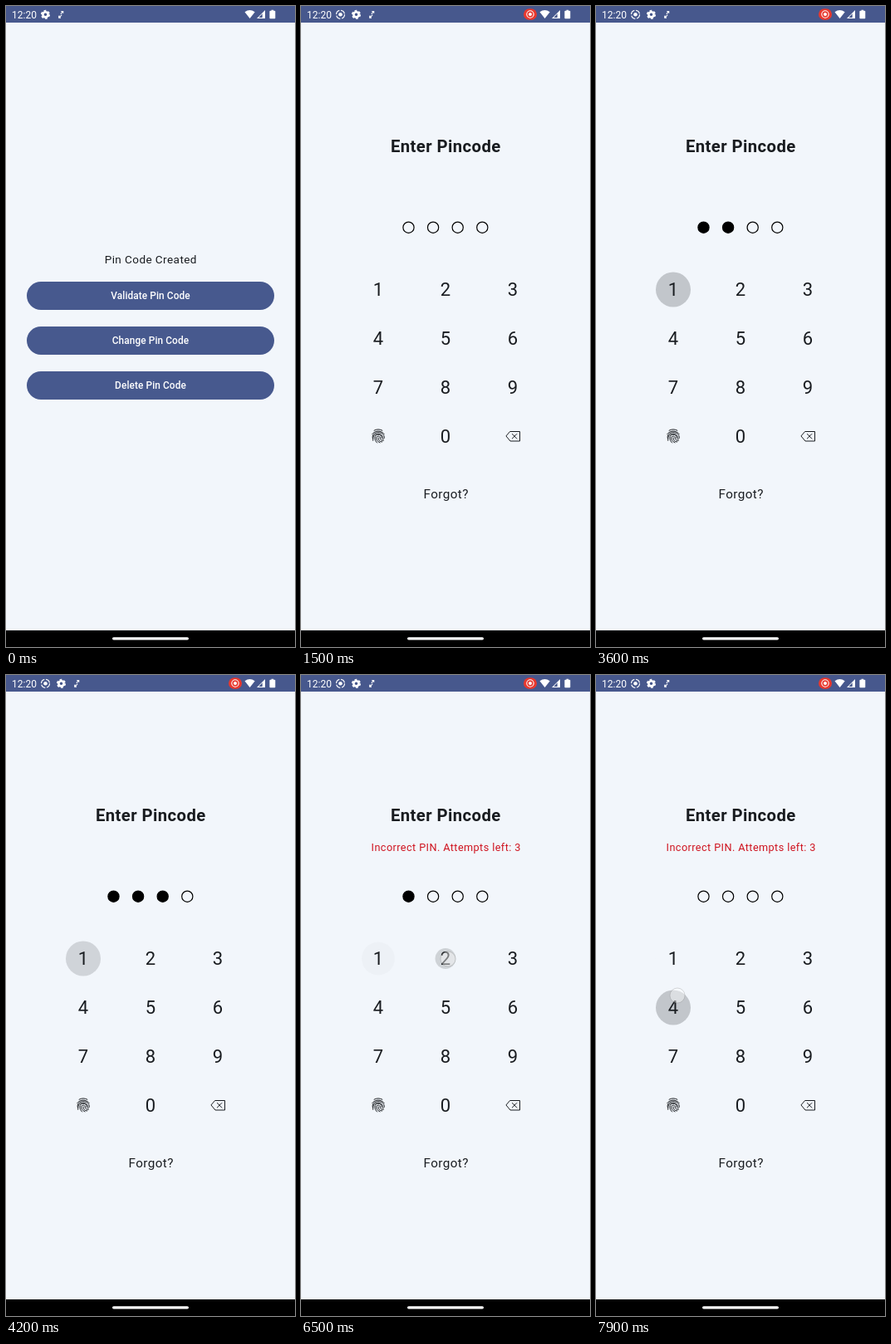
An HTML page for the animation above (8 s loop, 348 by 772 pixels).

```html
<!DOCTYPE html>
<html lang="en">
<head>
<meta charset="utf-8">
<title>Pin code</title>
<style>
  html, body { margin: 0; width: 100%; height: 100%; overflow: hidden; background: #f2f6fb; }
  svg { display: block; width: 100vw; height: 100vh; }
  text { font-family: Roboto, "Noto Sans", sans-serif; fill: #191c20; text-anchor: middle; }
  .body { font-size: 13.55px; letter-spacing: .423px; }
  .label { font-size: 11.86px; font-weight: 500; letter-spacing: .085px; fill: #fff; }
  .title { font-size: 20.3px; font-weight: 700; letter-spacing: .423px; }
  .error { font-size: 12.7px; letter-spacing: .41px; fill: #cf1420; }
  .forgot { font-size: 15.25px; letter-spacing: .423px; }
  .key { font-size: 22px; }
  .line { fill: none; stroke: #191c20; stroke-linecap: round; stroke-linejoin: round; }
</style>
</head>
<body>
<svg viewBox="0 0 348 772">
  <defs>
    <clipPath id="pill"><rect x="25" y="332" width="298" height="34" rx="17"/></clipPath>
    <radialGradient id="glow">
      <stop offset="0" stop-color="#fff" stop-opacity=".24"/>
      <stop offset=".5" stop-color="#fff" stop-opacity=".21"/>
      <stop offset="1" stop-color="#fff" stop-opacity="0"/>
    </radialGradient>
  </defs>
  <rect width="348" height="772" fill="#f2f6fb"/>

  <g id="menu">
    <text class="body" x="174.3" y="310">Pin Code Created</text>
    <g id="buttons"></g>
  </g>

  <g id="pin">
    <text class="title" x="174.3" y="176">Enter Pincode</text>
    <text class="error" id="error" x="174.7" y="212.3">Incorrect PIN. Attempts left: 3</text>
    <g id="dots" stroke="#000" stroke-width="1.2"></g>
    <g id="ripples" fill="#191c20"></g>
    <g id="keys"></g>
    <g class="line" transform="translate(82.8 507.8) scale(.847)" stroke-width="1.15">
      <path d="M6.2 4c3.6-2 8-2 11.6 0M3.5 9.2c4-5.6 13-5.6 17 0M4.2 15.5C2.8 10.5 6.5 6.9 12 6.9s9 3.6 8.6 7.6c-.3 2.3-3.6 2.2-3.8-.3-.3-6-9.6-6-9.6.2 0 3 1.2 5.4 3.2 7.2"/>
      <path d="M4.6 18.3c-.3-8 2.4-9.2 7.4-9.2 3.600 0 6.600 2 6.600 5M14.400 21.400c-3.500-1.400-5-4-5-7 0-3 5-3 5.200 0 .2 3 2.200 4.400 5 3.900M12 14.400c.1 3.600 2 6 5.600 5.900"/>
    </g>
    <path class="line" d="M252 512.500h11.500v11.500h-11.500l-4.800-5.750zM254.300 515.500l5.500 5.500m0-5.500l-5.500 5.500"/>
    <text class="forgot" x="174.700" y="593.300">Forgot?</text>
  </g>

  <circle id="touch" r="9" fill="#fff" fill-opacity=".42" stroke="#777" stroke-opacity=".35" stroke-width=".8"/>

  <rect width="348" height="20" fill="#47588d"/>
  <text x="7" y="14.600" style="font-size:12px;fill:#fff;text-anchor:start">12:20</text>
  <g id="record" fill="none" stroke="#fff">
    <circle cx="47.500" cy="10.300" r="5" stroke-dasharray="6 1.850" stroke-width="1.200"/>
    <circle cx="47.500" cy="10.300" r="2.300" fill="#fff" stroke="none"/>
  </g>
  <g id="tray">
    <circle cx="47.500" cy="10.300" r="3.100" fill="none" stroke="#fff" stroke-width="2.600"/>
    <circle cx="47.500" cy="10.300" r="4.700" fill="none" stroke="#fff" stroke-width="1.700" stroke-dasharray="2.700 2.222"/>
    <path d="M64.300 11.500l-.6 2.500M68.600 6.300l-2.800 3.300M67.200 10.500l-3 3.600M66.300 6.500h2.400v2.300M63.700 11.900v2.300h2.300" fill="none" stroke="#fff" stroke-width="1.100"/>
  </g>
  <g id="chip">
    <rect x="-8" y="-6.800" width="16" height="13.600" rx="6.800" fill="#e8382e"/>
    <circle r="4.200" fill="none" stroke="#fff" stroke-width="1.100"/>
    <circle r="2" fill="#fff"/>
  </g>
  <g fill="#fff">
    <path d="M287.500 7.300q6-4.800 12.200 0l-6.100 7.700z"/>
    <path d="M312 5v10h-10z"/>
    <path d="M308.700 9.300v4.700h-4.300z" fill="#47588d"/>
    <path d="M319.500 4.700h2.700v1h1.300q.8 0 .8.800v8q0 .8-.8.800h-5.300q-.8 0-.8-.8v-8q0-.8.800-.8h1.300z"/>
  </g>

  <rect y="752" width="348" height="20"/>
  <rect x="128" y="760.200" width="92" height="3.200" rx="1.600" fill="#fff"/>
</svg>
<script>
const LOOP = 8000, OPEN = 1500, FIRST_TRY = 4660;
const $ = id => document.getElementById(id);
const ramp = (t, a, b) => Math.min(1, Math.max(0, (t - a) / (b - a)));
const show = (el, on) => el.setAttribute("visibility", on ? "visible" : "hidden");

function add(parent, tag, attrs, text = "") {
  const el = document.createElementNS("http://www.w3.org/2000/svg", tag);
  for (const name in attrs) el.setAttribute(name, attrs[name]);
  el.textContent = text;
  return parent.appendChild(el);
}

// Moment of finger down, moment of entry, finger position, key
const taps = [
  [2600, 2800, 91, 339, 1], [3150, 3350, 91, 339, 1],
  [3700, 3900, 91, 339, 1], [4400, 4600, 91, 339, 1],
  [5700, 6000, 90, 338, 1], [6320, 6560, 177, 342, 2],
  [7050, 7200, 98, 387, 4], [7640, 7840, 98, 386, 4]
].map(([down, hit, x, y, key]) => ({ down, hit, x, y, key }));

const keyPos = key => key
  ? { x: 93 + (key - 1) % 3 * 81, y: 341.5 + Math.floor((key - 1) / 3) * 59 }
  : { x: 174, y: 518.5 };

["Validate", "Change", "Delete"].forEach((verb, i) => {
  const y = 332 + i * 54;
  add($("buttons"), "rect", { x: 25, y, width: 298, height: 34, rx: 17, fill: "#47598e" });
  if (!i) add(add($("buttons"), "g", { "clip-path": "url(#pill)" }),
    "circle", { id: "wave", cx: 191, cy: 346, fill: "url(#glow)" });
  add($("buttons"), "text", { class: "label", x: 174, y: y + 21.2 }, verb + " Pin Code");
});

for (let key = 0; key < 10; key++) {
  const { x, y } = keyPos(key);
  add($("keys"), "text", { class: "key", x, y: y + 7.6 }, key);
}
const dots = [0, 1, 2, 3].map(i =>
  add($("dots"), "circle", { cx: 129.5 + i * 29.6, cy: 266.7, r: 6.6 }));
const ripples = taps.map(tap => {
  const { x, y } = keyPos(tap.key);
  return add($("ripples"), "circle", { cx: x, cy: y });
});
const afterglow = add($("ripples"), "circle", { cx: 93, cy: 341.5, r: 20, opacity: .02 });

function draw(t) {
  const open = t >= OPEN;
  show($("menu"), !open);
  show($("pin"), open);

  const slide = ramp(t, 50, 250);
  $("tray").setAttribute("transform", `translate(${slide * 19} 0)`);
  $("record").setAttribute("opacity", slide);
  $("chip").setAttribute("transform", `translate(276 10) scale(${ramp(t, 50, 450)})`);

  $("wave").setAttribute("r", 160 * ramp(t, 1270, 1400));
  show($("wave"), !open && t >= 1270);

  const finger = !open && t >= 1290 ? { x: 191, y: 346 }
    : taps.find(tap => t >= tap.down && t < tap.hit + 70);
  show($("touch"), finger);
  if (finger) {
    $("touch").setAttribute("cx", finger.x);
    $("touch").setAttribute("cy", finger.y);
  }

  const round = t < FIRST_TRY ? taps.slice(0, 4) : taps.slice(4);
  const count = t >= taps[7].hit + 60 ? 0 : round.filter(tap => t >= tap.hit).length;
  dots.forEach((dot, i) => dot.setAttribute("fill", i < count ? "#000" : "none"));
  show($("error"), open && t >= FIRST_TRY);

  taps.forEach(({ hit }, i) => {
    const grow = ramp(t, hit - 110, hit + 40);
    const fade = 1 - ramp(t, hit + 250, hit + 430);
    ripples[i].setAttribute("r", 8 + 13 * grow);
    ripples[i].setAttribute("opacity", grow ? (.13 + .09 * grow) * fade : 0);
  });
  show(afterglow, t >= 5000 && t < 7000);
}

function tick() {
  draw(performance.now() % LOOP);
  requestAnimationFrame(tick);
}
tick();
</script>
</body>
</html>
```
